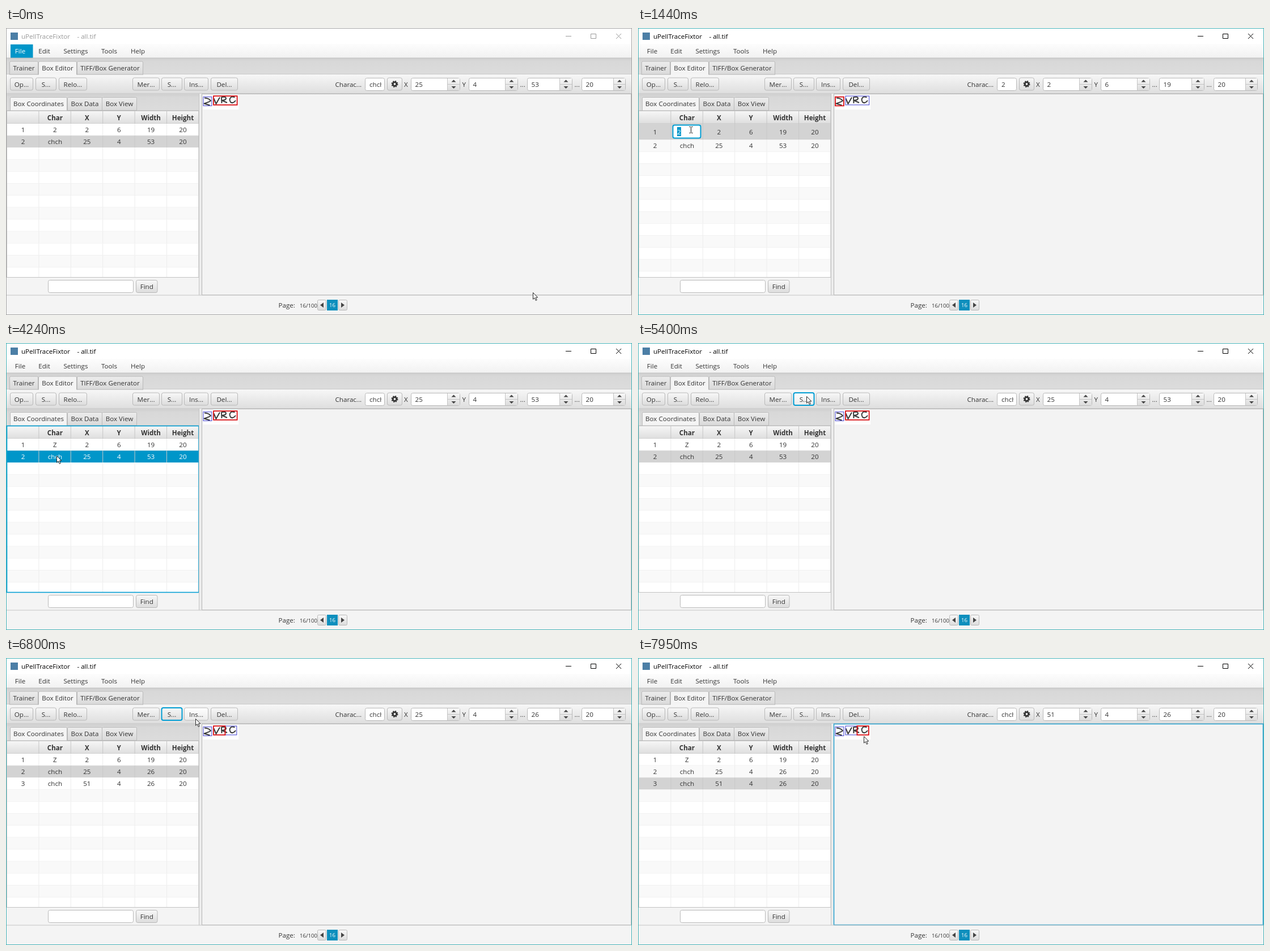
An HTML page that plays this animation: 1104x507 px, repeating every 8000 ms.

```html
<!DOCTYPE html>
<html lang="en">
<head>
<meta charset="utf-8">
<title>Box editor</title>
<style>
  html, body { margin: 0; width: 100%; height: 100%; overflow: hidden; background: #f4f4f4; }
  svg { display: block; }
  #stage { width: 100vw; height: 100vh; }
  text { font: 11.6px "Open Sans", "Noto Sans", sans-serif; white-space: pre; }
</style>
</head>
<body>
<svg id="stage" viewBox="0 0 1104 507" preserveAspectRatio="none">
  <defs>
    <linearGradient id="btn" x2="0" y2="1"><stop stop-color="#f8f8f8"/><stop offset="1" stop-color="#dcdcdc"/></linearGradient>
    <linearGradient id="hot" x2="0" y2="1"><stop stop-color="#fff"/><stop offset="1" stop-color="#ebebeb"/></linearGradient>
    <linearGradient id="tab" x2="0" y2="1"><stop stop-color="#ececec"/><stop offset="1" stop-color="#d9d9d9"/></linearGradient>
    <linearGradient id="strip" x2="0" y2="1"><stop stop-color="#cfcfcf"/><stop offset=".2" stop-color="#d8d8d8"/><stop offset="1" stop-color="#dcdcdc"/></linearGradient>
    <linearGradient id="bar" x2="0" y2="1"><stop stop-color="#f7f7f7"/><stop offset="1" stop-color="#dedede"/></linearGradient>
    <linearGradient id="menu" x2="0" y2="1"><stop stop-color="#fdfdfd"/><stop offset="1" stop-color="#f1f1f1"/></linearGradient>
    <linearGradient id="tip" x2="0" y2="1"><stop stop-color="#393939"/><stop offset="1" stop-color="#303030"/></linearGradient>
    <filter id="shade" x="-5%" y="-20%" width="110%" height="150%"><feDropShadow dx="0" dy="2" stdDeviation="2" flood-opacity=".45"/></filter>
  </defs>
  <g id="scene"></g>
</svg>
<script>
const LOOP = 8000, BLUE = '#039ed3', EDGE = '#b9b9b9', INK = '#333';
const scene = document.getElementById('scene');

const rect = (x, y, w, h, fill, more = '') =>
  `<rect x="${x}" y="${y}" width="${w}" height="${h}" fill="${fill}" ${more}/>`;
const frame = (x, y, w, h, fill, stroke = EDGE, r = 0, sw = 1) =>
  rect(x + .5, y + .5, w - 1, h - 1, fill, `stroke="${stroke}" stroke-width="${sw}" rx="${r}"`);
const path = (d, fill, stroke = 'none', sw = 1) =>
  `<path d="${d}" fill="${fill}" stroke="${stroke}" stroke-width="${sw}" stroke-linejoin="round"/>`;
const text = (x, y, str, fill = INK, anchor = 'start', style = '') =>
  `<text x="${x}" y="${y}" fill="${fill}" text-anchor="${anchor}" style="${style}">${str}</text>`;
const mid = (x, y, str, fill, style) => text(x, y, str, fill, 'middle', style);

// Pointer moves: start, end, number of steps, points
const moves = [
  [70, 604, 8, [929, 467], [92, 178]],
  [3780, 4160, 6, [92, 178], [89, 199]],
  [4640, 5400, 10, [89, 199], [350, 108], [297, 94]],
  [5630, 6410, 11, [297, 94], [118, 190], [177, 174]],
  [6490, 6798, 5, [177, 174], [334, 107]],
  [6875, 7260, 6, [334, 107], [396, 124]],
  [7330, 7560, 4, [396, 124], [395, 129]],
  [7950, 7950, 1, [395, 129], [398, 138]]
];

function pointer(t) {
  let pos = moves[0][3];
  for (const [t0, t1, n, ...pts] of moves) {
    if (t < t0) break;
    const k = n > 1 ? Math.min(n, Math.floor((t - t0) / ((t1 - t0) / (n - 1)) + 1.001)) : 1;
    const p = k / n, u = p * p * (3 - 2 * p) * (pts.length - 1);
    const i = Math.min(pts.length - 2, Math.floor(u)), f = u - i;
    pos = [0, 1].map(a => pts[i][a] + (pts[i + 1][a] - pts[i][a]) * f);
  }
  return pos;
}

// Value of the last entry whose time has passed
const at = (t, list) => list.reduce((v, [time, next]) => t >= time ? next : v, null);

function stateAt(t) {
  const split = t >= 5480;
  const rows = [[t < 3230 ? '2' : 'Z', 2, 6, 19, 20], ['chch', 25, 4, split ? 26 : 53, 20]];
  if (split) rows.push(['chch', 51, 4, 26, 20]);
  return {
    rows,
    sel: at(t, [[0, 1], [680, 0], [4240, 1], [7720, 2]]),
    focus: at(t, [[0, ''], [680, 'table'], [980, 'edit'], [3230, 'tab'], [4240, 'table'], [5400, 'split'], [7720, 'panel']]),
    active: t >= 604,
    menuOpen: t < 830,
    picked: t >= 1060 && t < 2850,
    typed: t >= 2850,
    caret: at(t, [[0, 0], [1140, 1], [1440, 0], [1990, 1], [2450, 0], [2850, 1], [3000, 0]]),
    beam: t >= 1060 && t < 3230,
    tip: t >= 7260 && t < 7870,
    pos: pointer(t)
  };
}

function titleBar(s) {
  const c = s.active ? '#000' : '#999';
  let out = rect(0, 0, 1104, 29, '#fff') + rect(8, 8, 13, 13, '#4c7fa6');
  out += text(27, 18.5, 'uPellTraceFixtor', c) + text(158.5, 18.5, '- all.tif', c, 'end');
  out += path('M987 14.5H997M1031.5 10.5h9v8h-9zM1076 10l9 9M1085 10l-9 9', 'none', c);
  out += rect(0, 28, 1104, 25, 'url(#menu)');
  if (s.menuOpen) out += rect(8, 29, 39.5, 24, '#0096c9');
  [['File', 25], ['Edit', 67.5], ['Settings', 123], ['Tools', 182], ['Help', 232.5]].forEach(([m, x], i) => {
    out += mid(x, 45.3, m, !i && s.menuOpen ? '#fff' : INK);
  });
  return out;
}

function tabs(list, y, bottom, on) {
  return list.map(([label, x, w], i) => {
    const top = i === on ? '#f4f4f4' : 'url(#tab)';
    return path(`M${x + .5} ${bottom}V${y + 2.5}q0-2 2-2H${x + w - 1.5}q2 0 2 2V${bottom}`, top, EDGE) +
      (i === on ? '' : rect(x, bottom - 1, w + 1, 1, EDGE)) + mid(x + w / 2 + .5, y + 16, label);
  }).join('');
}

function button(s, label, x, w, y = 87.5, ring = false) {
  const [px, py] = s.pos;
  const hot = px > x && px < x + w && py > y && py < y + 23;
  return frame(x, y, w, 23, hot ? 'url(#hot)' : 'url(#btn)', ring ? BLUE : EDGE, 3, ring ? 2 : 1) +
    mid(x + w / 2, y + 16, label);
}

function spinner(x, split, end, value) {
  const c = (split + end) / 2;
  return frame(x, 88, end - x, 23, '#fff', EDGE, 3) +
    rect(split, 89, end - split - 1, 21, 'url(#btn)') +
    path(`M${split + .5} 89v21M${split} 99.5H${end - 1}`, 'none', '#c4c4c4') +
    path(`M${c - 4} 95.5l4-4 4 4zM${c - 4} 103l4 4 4-4z`, '#444') +
    text(x + 7.5, 103.5, value);
}

function toolbar(s) {
  const [ch, x, y, w, h] = s.rows[s.sel];
  let out = rect(0, 82, 1104, 34, 'url(#bar)') + rect(0, 115.5, 1104, 1, '#bcbcbc');
  [['Op...', 7, 41], ['S...', 52, 37], ['Relo...', 93, 50], ['Mer...', 223, 48],
   ['S...', 274, 37], ['Ins...', 314, 43], ['Del...', 361, 48]].forEach(([l, bx, bw], i) => {
    out += button(s, l, bx, bw, 87.5, i === 4 && s.focus === 'split');
  });
  out += text(580.5, 103.5, 'Charac...') + frame(633, 88, 35, 23, '#fff', EDGE, 3);
  out += `<svg x="640" y="88" width="22" height="23">${text(1, 15.5, ch)}</svg>`;
  out += button(s, '', 672, 27);
  out += '<g fill="none" stroke="#333"><circle cx="685.5" cy="99" r="3.3" stroke-width="2.8"/>' +
    '<circle cx="685.5" cy="99" r="5" stroke-width="2" stroke-dasharray="2.1 1.827"/></g>';
  out += text(702, 103.5, 'X') + spinner(714, 778, 801, x) + text(804.5, 103.5, 'Y') + spinner(816, 880, 903, y);
  return out + text(906.5, 103.5, '...') + spinner(919, 976, 999, w) + text(1002.5, 103.5, '...') + spinner(1015, 1071, 1093, h);
}

function editField(s) {
  let out = frame(61, 171, 50, 24, '#fff', BLUE, 3, 2);
  if (s.picked) out += rect(69, 175, 7, 16, '#0096c9');
  out += text(69, 187.5, s.typed ? 'Z' : '2', s.picked ? '#fff' : INK);
  return out + (s.caret ? rect(s.typed ? 75 : 68, 175, 1, 16, '#222') : '');
}

function table(s) {
  const col = i => 1 + i * 56.4, ROW = 21.15;
  let out = rect(1, 146, 340, 295, '#fff') + rect(1, 146, 339, 23, 'url(#bar)'), y = 169;
  ['', 'Char', 'X', 'Y', 'Width', 'Height'].forEach((h, i) => {
    out += mid(col(i) + 29, 162.5, h, INK, 'font-weight:700') + rect(col(i + 1), 146, 1, 23, '#c6c6c6');
  });
  out += rect(1, 168.5, 339, 1, '#c4c4c4') + rect(1, 145.5, 339, 1, EDGE);
  for (let i = 0; y < 440; i++) {
    const edit = i === 0 && s.focus === 'edit';
    const h = Math.min(edit ? 28.5 : ROW, 440 - y);
    const on = i === s.sel, lit = on && s.focus === 'table';
    out += rect(1, y, 339, h, lit ? '#0096c9' : on ? '#d3d3d3' : i % 2 ? '#f9f9f9' : '#fff');
    if (!on && y + h < 440) out += rect(1, y + h - .6, 339, 1, '#ebebeb');
    for (let c = 1; c < 7; c++) out += rect(col(c), y, 1, h, on ? '#c9c9c9' : '#ededed');
    if (s.rows[i]) [i + 1, ...s.rows[i]].forEach((v, c) => {
      if (!(edit && c === 1)) out += mid(col(c) + 29, y + h / 2 + 4.3, v, lit ? '#fff' : INK);
    });
    y += h;
  }
  if (s.focus === 'edit') out += editField(s);
  const ring = s.focus === 'table';
  return out + frame(1, 146, 339.5, 295, 'none', ring ? BLUE : '#c2c2c2', 0, ring ? 1.6 : 1);
}

function leftPane(s) {
  let out = rect(1, 116.5, 340, 29.5, 'url(#strip)');
  out += tabs([['Box Coordinates', 7, 100], ['Box Data', 108, 61], ['Box View', 169, 61]], 122, 146, 0);
  out += table(s) + frame(74, 445, 151, 23, '#fff', EDGE, 3) + button(s, 'Find', 229, 38.5, 445);
  return out + rect(340.5, 116, 5, 356, '#ececec') + rect(340, 116, 1, 356, '#c4c4c4');
}

function imagePane(s) {
  let out = frame(345, 116, 758, 356, '#f3f3f3', s.focus === 'panel' ? '#2ea3cf' : '#b5b5b5', 0, s.focus === 'panel' ? 1.6 : 1);
  out += rect(347, 118, 63, 26, '#fff');
  out += path('M350 123.5Q358 124 361 128.5Q360 130 349.5 133.5L359.5 136.5', 'none', '#3c3c3c', 2);
  out += path('M366.5 124.5L370.5 134L377 122.5', 'none', '#3c3c3c', 2);
  out += path('M380.5 133L380 122.5Q388 120.5 388 124.5Q387.5 127.5 381 128L390 132', 'none', '#3c3c3c', 2);
  out += path('M403.5 122.5Q396 119.5 394.5 126Q395 133 400 132Q403 131 405 128', 'none', '#3c3c3c', 2);
  const box = ([, x, y, w, h], c, sw) => rect(346.4 + x * .785, 117 + y * .785, w * .785, h * .785, 'none', `stroke="${c}" stroke-width="${sw}"`);
  s.rows.forEach((r, i) => { if (i !== s.sel) out += box(r, '#4040d0', 1); });
  return out + box(s.rows[s.sel], '#d80f14', 1.8);
}

function pager() {
  return rect(1, 471.5, 1102, 1, '#c6c6c6') + text(480.5, 494, 'Page:') +
    text(518, 494, '16/100', INK, 'start', 'font-size:9.6px') +
    frame(549, 480, 16, 19, 'url(#btn)', EDGE, 2) + frame(586, 480, 16, 19, 'url(#btn)', EDGE, 2) +
    rect(566, 480, 19, 19, '#0e8fbd') + mid(575.5, 493, '16', '#fff', 'font-size:9.6px') +
    path('M560 485v9l-6-4.5zM591 485v9l6-4.5z', '#444');
}

function overlay(s) {
  const [x, y] = s.pos;
  let out = '';
  if (s.tip) {
    out += rect(388.5, 139, 360.5, 48, 'url(#tip)', 'rx="4" filter="url(#shade)"');
    out += text(402, 170, 'chch : U+0063U+0068U+0063U+0068', '#fff', 'start', 'font-size:19.2px');
  }
  if (s.beam) return out + path('M90.5 174.5h2l1 1 1-1h2M93.5 175.5v9M90.5 185.5h2l1-1 1 1h2', 'none', '#111');
  return out + `<g transform="translate(${x.toFixed(1)} ${y.toFixed(1)})">` +
    path('M.5.5V12.2L3.2 9.7L5.3 14.4L7.2 13.5L5.2 9H8.8Z', '#fff', '#111', .9) + '</g>';
}

function draw(s) {
  let out = rect(0, 0, 1104, 507, '#f4f4f4') + titleBar(s) + rect(0, 53, 1104, 29, 'url(#strip)');
  out += rect(0, 52.5, 1104, 1, '#c0c0c0') + rect(0, 81.5, 1104, 1, EDGE) + toolbar(s);
  out += tabs([['Trainer', 6, 50], ['Box Editor', 57, 67], ['TIFF/Box Generator', 125, 116]], 58.5, 82.5, 1);
  if (s.focus === 'tab') out += frame(58, 59.5, 65, 22, 'none', BLUE, 2, 1.4);
  out += leftPane(s) + imagePane(s) + pager();
  out += frame(0, 0, 1104, 507, 'none', s.active ? '#45b3b8' : '#a5a5a5');
  return out + overlay(s);
}

let shown = '';
function tick(now) {
  const s = stateAt(now % LOOP), key = JSON.stringify(s);
  if (key !== shown) {
    shown = key;
    scene.innerHTML = draw(s);
  }
  requestAnimationFrame(tick);
}
tick(0);
</script>
</body>
</html>
```
